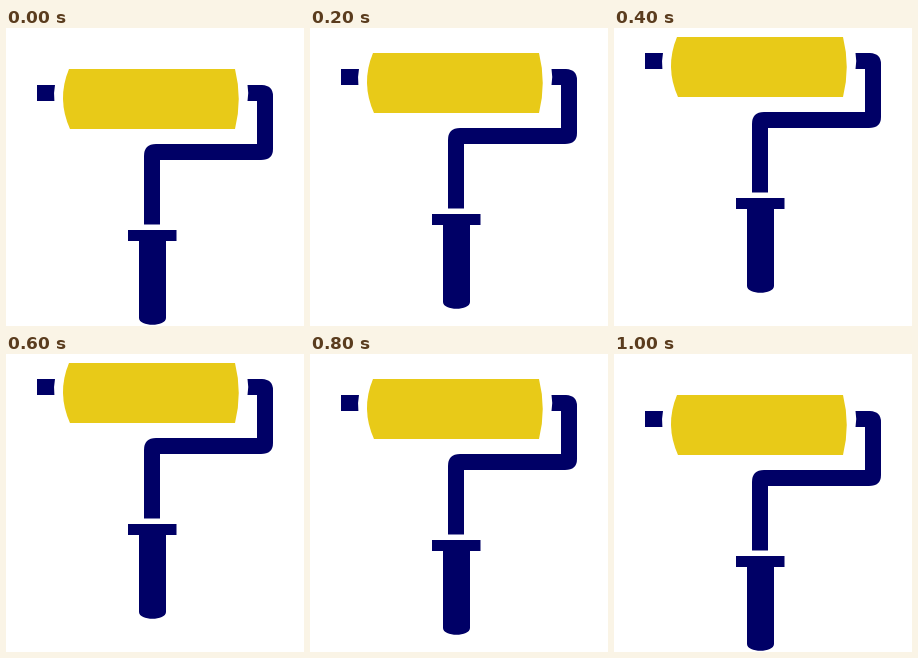
An HTML page that plays this animation: 298x298 px, repeating every 1100 ms.

```html
<!DOCTYPE html>
<html lang="en">
<head>
<meta charset="utf-8">
<title>Paint roller</title>
<style>
  html, body { margin: 0; width: 100%; height: 100%; overflow: hidden; background: #fff; }
  svg { display: block; width: 100%; height: 100%; }
</style>
</head>
<body>
<svg viewBox="0 0 298 298">
  <g id="roller" fill="#000066">
    <path d="M31 57H49Q47.4 65 48.4 73H31Z"/>
    <path fill="#e8ca18" d="M63 41H229Q236.5 71 229 101H64Q50.500 71 63 41Z"/>
    <path d="M241.500 57H256Q267 57.500 267 68V121Q267 132 255 132H154V196.500H138V128Q138 116 150 116H251V73H241.500Q243 65 241.500 57Z"/>
    <path d="M122 202H170.500V213H160V290C160 299 133 299 133 290V213H122Z"/>
  </g>
</svg>
<script>
  const roller = document.getElementById('roller');
  const STEP_MS = 100, STEPS = 11, PEAK = 5, RISE = 8;

  // The roller climbs in hard steps to the peak, then comes back down.
  function draw(ms) {
    const step = Math.floor(ms / STEP_MS) % STEPS;
    const lift = RISE * (PEAK - Math.abs(step - PEAK));
    roller.setAttribute('transform', `translate(0 ${-lift})`);
  }

  let start;
  function tick(now) {
    start ??= now;
    draw(now - start);
    requestAnimationFrame(tick);
  }
  draw(0);
  requestAnimationFrame(tick);
</script>
</body>
</html>
```
